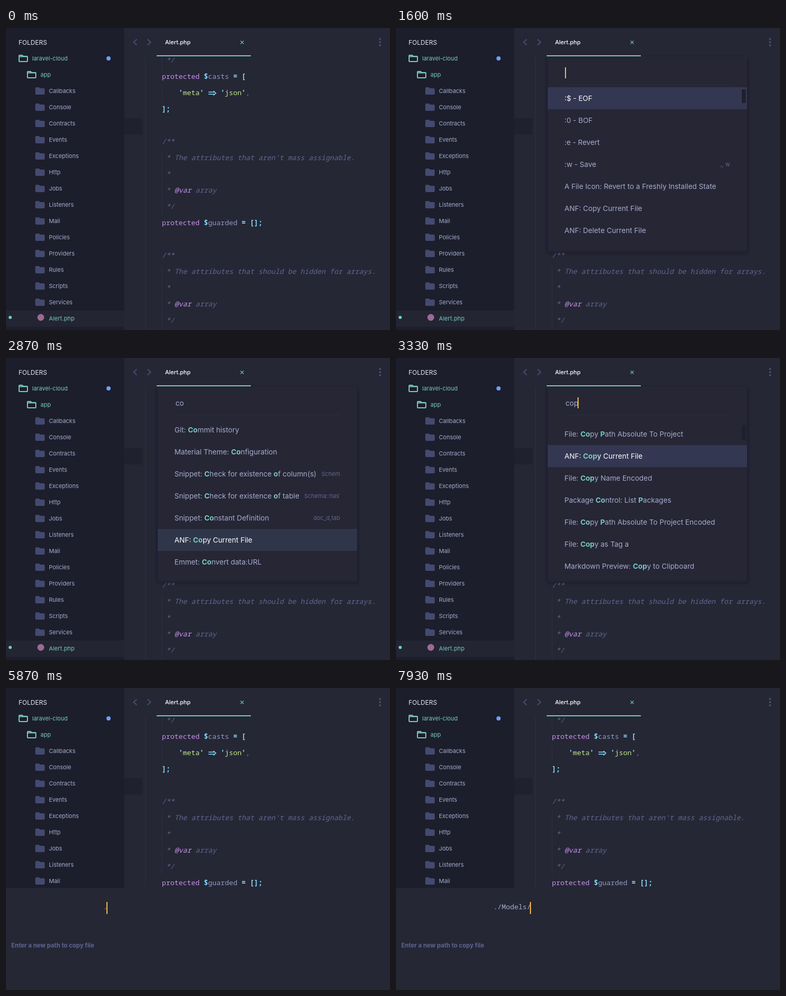
Animation, 734 px wide and 576 px high, one loop 8000 ms. Source, as an HTML page:

```html
<!DOCTYPE html>
<html lang="en">
<head>
<meta charset="utf-8">
<title>Copy file from the command palette</title>
<style>
html, body { margin: 0; width: 100%; height: 100%; overflow: hidden; background: #252735; }
svg { display: block; width: 734px; height: 576px; }
text { font: 11px Inter, sans-serif; fill: #a6accd; white-space: pre; }
.mono { font: 500 13.37px "Noto Sans Mono", monospace; }
.big { font-size: 13.65px; }
.kw { fill: #c792ea; }
.op { fill: #89ddff; font-weight: 600; }
.name { fill: #9198c4; }
.str { fill: #c3e88d; }
.dim { fill: #7077a0; }
.com { fill: #62668f; font-style: italic; }
.tag { fill: #c792ea; font-style: italic; }
.teal { fill: #78cbc0; }
.white { fill: #fff; }
.hit { fill: #78cbc0; font-weight: 700; }
.hint { fill: #62668f; }
.guide { stroke: #2e3144; }
.tab { font-weight: 500; }
.folders { font-size: 12px; fill: #e4e6f0; }
.caption { font-size: 11.5px; font-weight: 700; fill: #5f6392; }
</style>
</head>
<body>
<svg id="stage" viewBox="0 0 734 576">
  <defs>
    <clipPath id="codeClip"><rect x="226" y="54" width="508" height="522"/></clipPath>
    <clipPath id="listClip"><rect x="290" y="113" width="381" height="306"/></clipPath>
    <clipPath id="hintClip"><rect x="540" y="113" width="98.5" height="306"/></clipPath>
    <filter id="shadow" x="-10%" y="-10%" width="120%" height="120%">
      <feDropShadow dx="0" dy="3" stdDeviation="4" flood-color="#12131c" flood-opacity=".5"/>
    </filter>
  </defs>
  <g id="editor"></g>
  <g id="overlay"></g>
</svg>
<script>
const LOOP = 8000, OPEN = 1200, PROMPT = 5130;

const rect = (x, y, w, h, fill, more = '') =>
  `<rect x="${x}" y="${y}" width="${w}" height="${h}" fill="${fill}" ${more}/>`;
const circle = (x, y, r, fill) => `<circle cx="${x}" cy="${y}" r="${r}" fill="${fill}"/>`;
const text = (x, y, s, cls = '', more = '') => `<text x="${x}" y="${y}" class="${cls}" ${more}>${s}</text>`;
const span = (cls, s) => `<tspan class="${cls}">${s}</tspan>`;
const stroke = (d, color, w) => `<path d="${d}" fill="none" stroke="${color}" stroke-width="${w}"/>`;
const guide = (x, y1, y2) => `<path class="guide" d="M${x} ${y1}V${y2}"/>`;

const folder = (x, y) =>
  `<path d="M${x + 2} ${y - 7}h5l2 2h7q2 0 2 2v8q0 2-2 2h-14q-2 0-2-2v-10q0-2 2-2z" fill="#444a70"/>`;
const openFolder = (x, y) =>
  stroke(`M${x + 2} ${y - 6}h5l2 2h7q1 0 1 1v8q0 1-1 1h-14q-1 0-1-1v-10q0-1 1-1zM${x + 1} ${y - 3.5}h16`, '#78cbc0', 2);

function sidebar() {
  const dirs = ['Callbacks', 'Console', 'Contracts', 'Events', 'Exceptions', 'Http', 'Jobs',
    'Listeners', 'Mail', 'Policies', 'Providers', 'Rules', 'Scripts', 'Services'];
  return rect(0, 0, 226, 576, '#1c1e2b') + rect(0, 539, 226, 31, '#232533') +
    text(24, 32, 'FOLDERS', 'folders') +
    openFolder(24, 58) + text(50, 62, 'laravel-cloud', 'teal') + circle(196, 58, 4, '#739df8') +
    openFolder(40, 89) + text(66, 93, 'app', 'teal') +
    dirs.map((d, i) => folder(56, 120 + 31 * i) + text(82, 124 + 31 * i, d)).join('') +
    circle(8, 552, 3, '#78cbc0') + circle(66.5, 552, 6.5, '#9c6a94') +
    text(82, 558, 'Alert.php', 'teal', 'letter-spacing=".15"');
}

function code() {
  const com = s => span('com', s);
  const prop = (name, rest) =>
    span('kw', 'protected ') + span('op', '$') + span('name', name) + span('op', rest);
  const quoted = s => span('op', "'") + span('str', s) + span('op', "'");
  const doc = s => [com('/**'), com(' * ' + s), com(' *'),
    com(' * ') + span('tag', '@var') + com(' array'), com(' */')];
  const lines = [
    com(' */'), prop('casts', ' = ['),
    '    ' + quoted('meta') + '    ' + quoted('json') + span('dim', ','),
    span('op', '];'), '',
    ...doc("The attributes that aren't mass assignable."), prop('guarded', ' = [];'), '',
    ...doc('The attributes that should be hidden for arrays.')
  ];
  return `<g clip-path="url(#codeClip)">` + rect(226, 172, 35, 31, '#1f212e') +
    guide(266.5, 54, 576) + guide(298.5, 54, 80) + guide(298.5, 108, 139) +
    guide(298.5, 235, 357) + guide(298.5, 452, 576) +
    lines.map((l, i) => text(298, 65.7 + 31 * i, l, 'mono')).join('') +
    stroke('M387 122.3h12M387 126.3h12M396.5 120l4.8 4.3l-4.8 4.3', '#89ddff', 1.4) + `</g>`;
}

function topBar() {
  return stroke('M250 21.5l-6 5.5 6 5.5M270.5 21.5l6 5.5-6 5.5', '#474c72', 2) +
    text(304, 31, 'Alert.php', 'tab white') +
    stroke('M448.3 24.3l6 6m0-6l-6 6', '#78cbc0', 1.2) +
    [21, 27, 33].map(y => circle(715, y, 2, '#474c72')).join('');
}

const underline = rect(288, 52, 180, 2, '#78cbc0');

// Asterisks wrap the matched letters; a bar starts the hint.
const LISTS = {
  all: { top: 113, pick: 0, bar: [117, 26], rows: [':$ - EOF', ':0 - BOF', ':e - Revert', ':w - Save|,, w',
    'A File Icon: Revert to a Freshly Installed State', 'ANF: Copy Current File', 'ANF: Delete Current File'] },
  co: { top: 116, pick: 5, rows: ['Git: *Co*mmit history', 'Material Theme: *Co*nfiguration',
    'Snippet: *C*heck for existence *o*f column(s)|Schema|603', 'Snippet: *C*heck for existence *o*f table|Schema::hasT|570',
    'Snippet: *Co*nstant Definition|doc_d,tab', 'ANF: *Co*py Current File', 'Emmet: *Co*nvert data:URL'] },
  cop: { top: 124, pick: 1, bar: [128, 28], rows: ['File: *Co*py *P*ath Absolute To Project', 'ANF: *Cop*y Current File',
    'File: *Cop*y Name Encoded', 'Package *Co*ntrol: List *P*ackages',
    'File: *Co*py *P*ath Absolute To Project Encoded', 'File: *Cop*y as Tag a',
    'Markdown Preview: *Cop*y to Clipboard'] }
};

const caret = (x, y, h) => rect(x, y, 2, h, '#f3bd48');

function row(item, i, list) {
  const [label, hint, x] = item.split('|');
  const y = list.top + 42 * i, on = i === list.pick;
  const body = label.split('*').map((s, j) => j % 2 ? span('hit', s) : s).join('');
  return (on ? rect(290, y, 381, 42, list === LISTS.co ? '#30364a' : '#343751') : '') +
    text(322, y + 26, body, on ? 'big white' : 'big') +
    (hint ? `<g clip-path="url(#hintClip)">` +
      text(x || 638.5, y + 25, hint, 'hint', x ? '' : 'text-anchor="end"') + `</g>` : '');
}

function palette(query, blink, scrolling) {
  const list = LISTS[query.length > 2 ? 'cop' : query ? 'co' : 'all'];
  return rect(290, 54, 381, 371, '#252735', 'filter="url(#shadow)"') +
    rect(322, 108, 317, 1, '#2c2f40') + text(324, 91, query, 'big') +
    (blink ? caret(323 + 8 * query.length, 75, 21) : '') +
    `<g clip-path="url(#listClip)">` + list.rows.map((r, i) => row(r, i, list)).join('') +
    (scrolling && list.bar ? rect(661, list.bar[0], 7.5, list.bar[1], '#1e202d', 'rx="1"') : '') + `</g>`;
}

function prompt(path, blink) {
  return rect(0, 381.5, 734, 194.5, '#252735') +
    text(186, 421.5, path, 'mono') +
    (blink ? caret(184 + 8 * path.length, 408, 23) : '') +
    text(10, 495, 'Enter a new path to copy file', 'caption');
}

const typed = (s, times, t) => s.slice(0, times.filter(k => k <= t).length);
const QUERY = [2500, 2700, 3050];
const PATH = [5850, 6050, 6450, 6630, 6800, 6950, 7130, 7300, 7550];

const editor = document.getElementById('editor');
const overlay = document.getElementById('overlay');
editor.innerHTML = sidebar() + code() + topBar() + underline;

let shown = null;
function draw(t) {
  let next = '';
  if (t >= PROMPT) {
    next = prompt(typed('./Models/', PATH, t), t >= PATH[0] || t < PROMPT + 500);
  } else if (t >= OPEN) {
    next = palette(typed('cop', QUERY, t), (t - OPEN) % 1000 < 500, t < 3900) + underline;
  }
  if (next !== shown) overlay.innerHTML = shown = next;
}

const start = performance.now();
function tick() {
  draw((performance.now() - start) % LOOP);
  requestAnimationFrame(tick);
}
tick();
</script>
</body>
</html>
```
